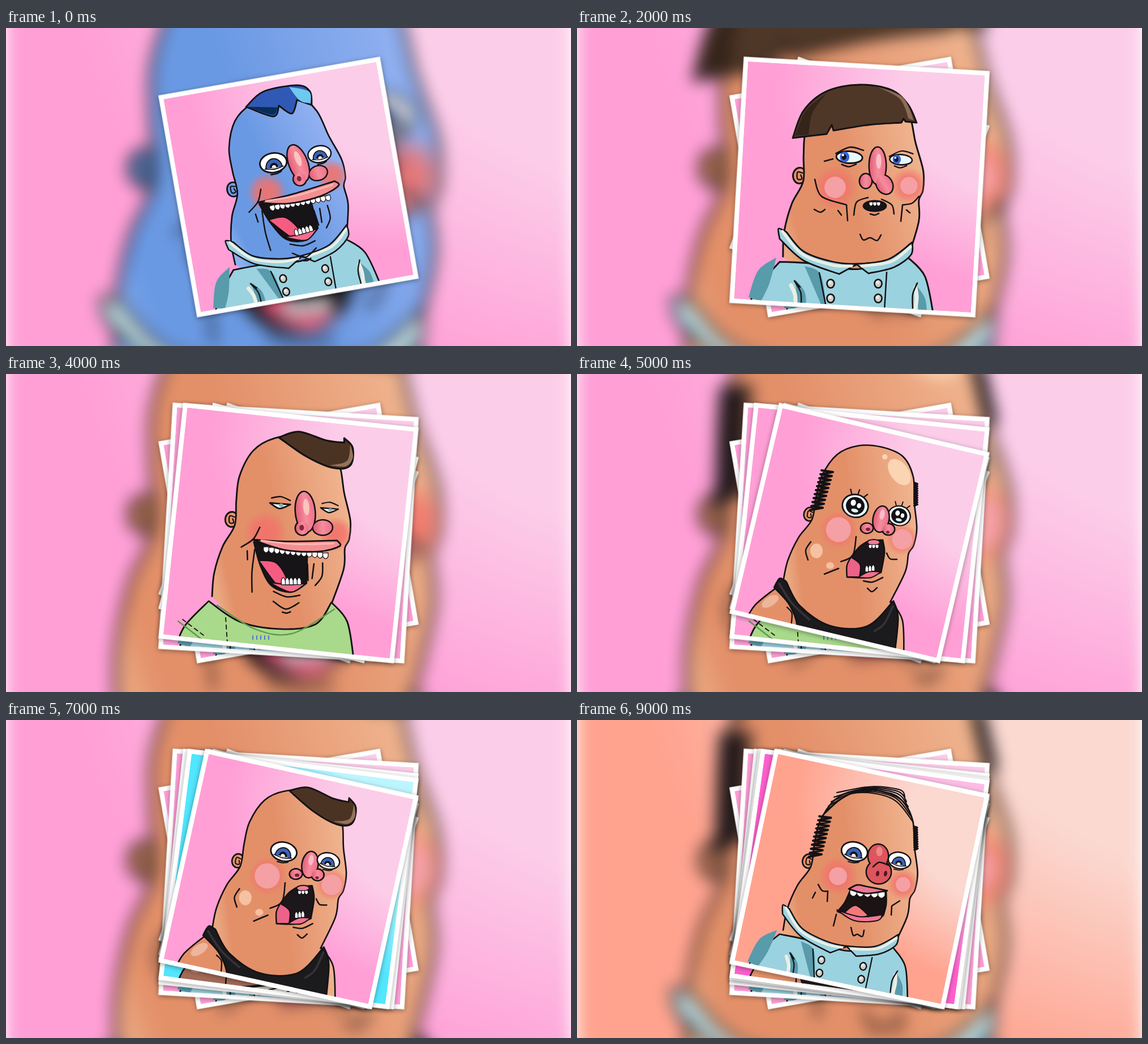
Animation, 998 px wide and 561 px high, one loop 10 s. Source, as an HTML page:

```html
<!DOCTYPE html>
<html lang="en">
<head>
<meta charset="utf-8">
<title>Portrait pile</title>
<style>
html, body { margin: 0; width: 100%; height: 100%; overflow: hidden; background: #fff; }
svg { display: block; width: 100vw; height: 100vh; stroke-linecap: round; stroke-linejoin: round; }
.blur { filter: blur(14px); }
.shadow { filter: drop-shadow(0 2px 4px rgba(0, 0, 0, .38)); }
.step { animation: 10s step-end infinite; }
</style>
</head>
<body>
<script>
const INK = '#141114', CX = 499, CY = 280.5, BOX = 460, UNIT = 400, BORDER = 8;

// Every tilted card fits the same box; the offset is how far a corner sits from the box corner.
const cards = [-68.5, 122, 25.5, 96.5, 44, 88, 52, 83, 56, 80].map(offset => {
  const rest = BOX - Math.abs(offset);
  return { angle: Math.atan2(offset, rest) * 180 / Math.PI, side: Math.hypot(offset, rest) };
});
const inner = card => card.side - 2 * BORDER;

// Art laid out on tilted card i, turned into upright picture space.
const upright = i => `scale(${UNIT / inner(cards[i])}) rotate(${-cards[i].angle}) translate(${-CX} ${-CY})`;
const on = (i, art) => `<g transform="${upright(i)}">${art}</g>`;
const repeat = (n, make) => Array.from({ length: n }, (_, k) => make(k)).join('');

// Smooth curve through key points; a slash marks a corner.
const smooth = text => text.split('/').map((run, k) => {
  const n = run.trim().split(/\s+/).map(Number);
  const pts = n.filter((_, i) => i % 2 === 0).map((x, i) => [x, n[2 * i + 1]]);
  const handle = (at, from, to) => at.map((v, j) => (v + (to[j] - from[j]) / 6).toFixed(1));
  return (k ? 'L' : 'M') + pts[0] + pts.slice(1).map((c, i) => {
    const b = pts[i], a = pts[i - 1] || b, e = pts[i + 2] || c;
    return `C${handle(b, a, c)} ${handle(c, e, b)} ${c}`;
  }).join('');
}).join('');

const path = (d, fill, width, ink = INK) => `<path d="${d}" fill="${fill}" stroke="${ink}" stroke-width="${width}"/>`;
const shape = (text, fill, width = 2.8, ink) => path(smooth(text) + 'Z', fill, width, ink);
const line = (text, width = 2.5, ink) => path(text.split('|').map(smooth).join(''), 'none', width, ink);
const oval = (x, y, rx, ry, fill, turn = 0, width = 0) =>
  `<ellipse cx="${x}" cy="${y}" rx="${rx}" ry="${ry}" fill="${fill}" transform="rotate(${turn} ${x} ${y})" stroke="${INK}" stroke-width="${width}"/>`;

// Overlapping ovals with one common outline.
const blob = (parts, fill, glint) => [5, 0].map(width =>
  parts.map(([x, y, rx, ry, turn]) => oval(x, y, rx, ry, fill, turn, width)).join('')).join('') +
  (glint ? oval(parts[0][0] + 2, parts[0][1] - 8, parts[0][2] / 3, parts[0][3] / 2.4, glint, parts[0][4]) : '');

const teeth = (x, y, width, rise, n, h) => path(repeat(n, k => {
  const w = width / n;
  return `M${x + k * w} ${y + k * rise / n}v${h * .6}q${w / 2} ${h * .8} ${w} 0v${-h * .6}z`;
}), '#fff', 1.2);

// Heads and bodies
const HEAD = '364 385 369 345 385 300 407 264 411 222 418 180 443 137 480 117 525 115 567 129 590 165 597 215 606 262 603 294 595 310 592 345 569 405';
const ear = tone => oval(402, 254, 11, 13, `url(#${tone})`, 8, 2.8) + line('407 250 399 248 398 259 405 260 404 253', 2.2);
const head = tone => on(8, ear(tone) + shape(HEAD + ' / 569 405 540 468 440 462 364 385', `url(#${tone})`, 0) + line(HEAD, 2.8));

const body = (fill, dip) => on(8, shape(`297 475 315 435 358 393 / 358 393 410 ${dip - 15} 480 ${dip} 540 ${dip - 6} 569 402 / 569 402 595 436 604 500 / 604 540 290 540`, fill));
const bare = tone => body(`url(#${tone})`, 420) + head(tone);
const shine = on(8, oval(343, 425, 18, 9, '#fff5', -38) + line('376 433 386 443 387 465|571 450 580 470 578 490'));

const tank = on(8, shape('348 398 357 380 370 385 / 370 385 400 428 460 460 530 454 575 402 / 575 402 587 435 586 520 / 400 520 398 465 380 428 348 398', '#1b1a1c') +
  line('357 390 385 425 420 452|575 412 562 446 545 462', 4, '#343236'));

const sleeves = (dark, light) => on(2,
  shape('303 475 320 428 352 405 / 352 405 340 450 325 482', dark, 0) + shape('385 443 402 465 405 490 / 390 490', dark, 0) +
  shape('598 452 614 475 618 498 / 603 498', dark, 0) + line('378 454 385 470 386 485|598 458 600 475 598 495', 7, light) +
  line('384 446 395 466 396 488|386 448 394 457|601 450 593 470 593 494'));

const uniform = body('#9bd2df', 415) + sleeves('#589bab', '#eceee4') + on(2,
  shape('402 420 430 434 440 490 / 432 490', '#589bab', 0) + line('428 432 440 492|547 431 543 498') +
  shape('358 372 356 354 370 360 / 370 360 400 394 450 412 494 416 550 408 592 378 / 592 378 590 400 560 422 515 433 / 494 417 463 434 / 463 434 400 410 358 372', '#9bd2df') +
  line('363 359 398 399 450 418 485 420|503 420 555 412 589 386', 5, '#eceee4') +
  [448, 532].map(x => [451, 477].map(y => oval(x, y, 6.5, 7.5, '#c9cbc5', 0, 2.6) + oval(x - 1, y - 2, 3, 3, '#e9eae5')).join('')).join(''));

const sweater = body('#fff', 445) + on(3,
  shape('352 360 366 353 / 366 353 400 396 470 416 555 403 / 555 403 548 427 470 429 400 403 352 360', '#fff') +
  line('327 425 334 411 345 407|556 484 557 468 564 457'));

const shirt = body('#a9d98a', 445) + on(4, line('373 408 440 450 505 458 580 415|304 436 348 470', 2.4, '#5e9a4c') +
  `<g stroke-dasharray="7 6">${line('312 433 353 464|388 430 392 490', 1.8)}</g>` +
  line(Array.from({ length: 5 }, (_, k) => `${436 + 7 * k} 462 ${436 + 7 * k} 468`).join('|'), 2, '#5277c9'));

const toga = on(6, shape('385 472 470 462 573 403 / 573 403 584 404 / 584 404 560 450 498 492', '#e8e9dd') +
  line('425 474 490 466 530 443|550 450 570 422', 6, '#bfc0b9') + line('410 473 490 463 530 434|455 478 510 462 552 422|490 483 540 456 570 417') +
  line('376 434 388 446 388 466|571 452 577 470 579 490') + oval(343, 430, 20, 12, '#fff4', -38));

// Hair
const bowl = on(2, shape('381 194 400 146 440 112 500 100 555 109 585 135 600 167 / 600 167 580 165 / 577 160 573 167 / 573 167 515 171 453 181 / 450 171 441 187', '#4e3726') +
  shape('531 104 575 122 595 163 / 586 160 570 125 531 104', '#8c6b55', 0) + shape('385 190 405 145 440 116 / 440 116 416 150 409 188', '#35241a', 0));
const swoop = on(3, shape('507 129 540 125 580 145 608 153 / 609 146 620 163 612 190 585 190 545 165 507 129', '#4b3323') +
  shape('617 157 618 178 605 190 580 185 / 580 185 608 182 617 157', '#95735a', 0));
const quiff = on(0, shape('424 139 455 112 514 101 537 112 540 136 / 540 136 514 127 / 514 127 505 151 482 137 / 482 137 472 156 424 139', '#3059b5') +
  shape('428 139 480 140 / 480 140 470 153 428 139', '#092d59', 0) + shape('500 104 535 112 538 133 / 538 133 519 128 500 104', '#6ec9ef', 0));
const sides = on(5, path('M432 170' + 'l20 3-22 4'.repeat(10) + 'M596 192' + 'l5 2-5 2'.repeat(10), 'none', 4));
const wisps = on(9, line(Array.from({ length: 6 }, (_, k) =>
  `${434 + 5 * k} ${168 - 8 * k} ${485 + 7 * k} ${130 - 2.5 * k} ${555 + 3 * k} ${138 - 3 * k} ${594 - 3 * k} ${180 - 9 * k}`).join('|'), 2.2));
const glare = on(8, oval(563, 159, 28, 17, '#fbd4b4', 48) + oval(533, 133, 5, 5, '#fbd4b4'));

// Short bristles standing on the dome of the skull.
const sprouts = on(8, repeat(6, k => {
  const t = (195 + 27 * k) * Math.PI / 180, x = 505 + 90 * Math.cos(t), y = 190 + 76 * Math.sin(t);
  return repeat(3, j => {
    const dx = 8 * Math.cos(j * 1.05 + .5), dy = 8 * Math.sin(j * 1.05 + .5);
    return line(`${x - dx} ${y - dy} ${x + dx} ${y + dy}`, 2.2);
  });
}));

// Eyes and cheeks keep their places on every upright face.
const eyes = art => [[-20, -49, 1], [67, -50, .86]].map(([x, y, size]) => `<g transform="translate(${x} ${y}) scale(${size})">${art}</g>`).join('');
const dome = (r, fill) => path(`M${-r} 9a${r} ${r * 1.1} 0 0 1 ${2 * r} 0z`, fill, 0);
const roundEyes = eyes(oval(0, 0, 25, 18, '#fff', 0, 3) + dome(16, INK) + dome(14, '#3b62b8') + dome(8, INK) + dome(4, '#fff') +
  line('-17 9 0 12 17 9', 2) + line('-8 21 3 21 12 18'));
const sleepyEyes = eyes(shape('-18 0 18 -1 / 18 -1 0 8 -18 0', '#e6f5f1') + oval(2, 2, 4, 3, '#86aeb4') + line('-16 -9 0 -13 17 -8'));
const glanceEyes = eyes(oval(0, 0, 22, 10, '#e8f8ff', 0, 2.8) + oval(-8, 0, 8, 9, '#3763dc') + oval(-9, 0, 4, 5, INK) + oval(-11, -3, 2, 2, '#fff') +
  line('-23 -5 0 -17 23 -13|-12 13 0 16 12 11'));
const staringEyes = eyes(oval(0, 0, 22, 18, '#fff', 0, 3) + oval(1, 0, 4, 3.5, INK) + oval(-1, 0, 2, 1.6, '#fff')) +
  line('-44 -68 -20 -66 3 -63|52 -63 70 -69 87 -74', 3.2) + line('-28 -28 -18 -27 -8 -32|70 -32 79 -32 86 -36');
const sparklyEyes = eyes(oval(0, 0, 25, 22, '#e9fbff', 0, 3) + oval(0, 0, 18, 17, INK) + oval(-5, -5, 5, 6, '#fff') +
  oval(7, -2, 4, 5, '#fff') + oval(1, 9, 7, 3.5, '#d8f7ff') + line('-12 -21 -16 -29|0 -23 1 -32|12 -20 18 -27'));
const shutEyes = eyes(line('-19 -8 -2 7 19 -10|-8 5 -12 11|0 7 0 13|8 4 12 10') +
  line(Array.from({ length: 4 }, (_, k) => `${-11 + 6 * k} -26 ${-10 + 6 * k} -20`).join('|')));

const cheeks = r => `<g clip-path="url(#face)">` + [[-41, 3, 1], [83, -7, .82]].map(([x, y, size]) =>
  oval(x, y, 38 * size, 38 * size, 'url(#blush)') + oval(x, y, r * size, r * size, '#f4a0a4')).join('') + '</g>';

const laugh = cheeks(0) + on(8,
  shape('439 294 449 335 467 370 500 382 527 368 / 530 318', '#171417') +
  shape('446 326 476 331 493 360 480 373 446 326', '#f65c82', 2) +
  shape('463 364 495 369 526 368 / 526 368 500 382 463 364', '#f46d8d', 2) +
  teeth(484, 369, 34, 1, 5, -12) + teeth(455, 303, 111, 15, 12, 10) +
  shape('437 290 500 295 582 296 / 582 296 586 306 550 314 490 309 437 290', '#f48e91') + line('452 292 510 300 576 301', 3, '#fbb9b4') +
  blob([[529, 245, 16, 34, -3], [523, 273, 11, 11], [558, 273, 16, 12]], 'url(#nose)', '#fcc4bf') + oval(522, 272, 4, 5, '#87273c') +
  line('440 307 434 345 433 380|427 309 427 324|417 302 438 289 450 269|530 335 530 363|541 335 537 360|556 334 554 357 542 372') +
  line('470 380 492 390 515 388|469 397 490 411 513 401|484 416 491 418 498 416'));

const glance = cheeks(18) + glanceEyes + on(2,
  blob([[531, 243, 14, 32], [510, 270, 10, 12], [543, 276, 13, 17, -30]], 'url(#nose)', '#fac0c6') +
  oval(526, 314, 20, 9, '#171417', 0, 2.8) + teeth(516, 307, 20, 0, 3, 7) +
  line('489 330 494 307 514 299|538 302 556 312 560 328|420 267 432 297 476 312 / 478 340|604 297 592 309 575 312 / 572 341') +
  line('500 364 506 374 518 370 530 375 537 365|419 320 430 325 438 320|461 322 467 330|582 321 588 326|437 235 452 231|518 328 526 330 533 327'));

const drool = cheeks(20) + on(6,
  oval(424, 320, 10, 13, '#fff4') + oval(516, 323, 50, 31, '#80684a', -17, 2.8) + oval(516, 320, 37, 18, '#171417', -14, 2.8) +
  teeth(510, 307, 24, -4, 3, 8) + teeth(501, 339, 26, -5, 4, -8) +
  shape('485 330 508 332 / 501 365 494 360 487 366', '#9ccdec', 2.2, '#356dc1') + line('494 338 494 356', 3, '#d4f2fb') +
  line('438 317 442 326 439 336|448 323 448 332|456 312 478 303 488 284|547 284 572 300|560 340 567 348'));

const pickle = on(3, blob(Array.from({ length: 24 }, (_, k) => {
  const t = (k >> 1) / 11, side = k % 2 * 2 - 1, spread = 7 + 7 * t;
  return [532 + 13 * t + side * spread, 229 + 80 * t + 2 * Math.sin(k * 5), 9, 9];
}), '#69aa43') + repeat(6, k => oval(533 + k * 2.5 + 5 * Math.sin(k * 3), 235 + k * 13, 3, 5, '#94cd62') +
  line(`${535 + 6 * Math.sin(k * 4)} ${242 + k * 12} ${540 + 6 * Math.sin(k * 4)} ${240 + k * 12} ${542 + 6 * Math.sin(k * 4)} ${247 + k * 12}`, 2.2, '#2e6726')));

const gasp = cheeks(24) + on(5,
  oval(423, 312, 11, 13, '#f5c1a0') + oval(447, 338, 7, 6, '#f5c1a0') +
  shape('485 322 500 304 516 294 / 540 293 543 315 537 350 / 537 350 510 359 477 358 / 477 358 477 338 485 322', '#1b171a') +
  shape('484 323 500 336 499 358 / 477 358 477 338 484 323', '#ec6288', 2) +
  shape('496 359 515 349 537 349 / 537 349 520 359 496 359', '#f36e90', 2) + teeth(509, 349, 17, -2, 3, -11) +
  oval(524, 297, 11, 5, '#f37b98', 0, 2) + teeth(515, 301, 18, 0, 3, 7) +
  blob([[537, 256, 13, 22, 10], [512, 272, 10, 8], [550, 274, 10, 9]], 'url(#nose)', '#fbbcc9') + oval(514, 274, 4, 3, '#7c233d') + oval(549, 279, 3, 2.5, '#7c233d') +
  line('408 328 404 311 413 296|437 353 462 343|466 331 487 320 493 287|547 316 553 326 565 327|506 365 522 367 540 359|513 378 521 384 530 377'));

const shut = shutEyes + on(6,
  blob([[529, 239, 13, 22], [517, 256, 10, 14, -25], [541, 257, 10, 14, 20], [534, 271, 9, 19]], 'url(#nose)', '#fbb9c9') +
  line('524 254 527 263 534 264|515 256 519 261'));

const shout = cheeks(17) + on(9,
  shape('483 300 546 303 / 546 303 546 325 541 345 / 541 345 500 350 460 338 / 460 338 473 322 483 300', '#1c1314') +
  shape('471 341 492 327 515 345 / 515 345 495 349 471 341', '#f4787b', 2) +
  shape('459 335 500 347 541 343 / 541 343 530 354 490 354 459 335', '#ee7896', 2) +
  teeth(482, 300, 62, 4, 5, 11) + shape('480 298 495 291 513 294 548 301 / 548 301 510 306 480 298', '#ec7894') +
  blob([[532, 240, 17, 20], [533, 268, 21, 20]], '#dd555d', '#ee8684') + line('523 259 534 251 550 256') +
  [531, 545].map(x => oval(x, 271, 3, 5, '#541923', 10)).join('') +
  line('426 290 433 301 443 302 / 442 320|421 304 416 314|458 343 453 363|544 331 538 347|570 319 556 328 / 555 344|484 366 488 380 495 378 504 382 507 371'));

const portraits = [
  ['pink', head('blue') + uniform + quiff + laugh + roundEyes],
  ['pink', head('skin') + sweater + sides + gasp + roundEyes],
  ['pink', head('skin') + uniform + bowl + glance],
  ['cyan', head('skin') + sweater + swoop + drool + staringEyes + pickle],
  ['pink', head('skin') + shirt + swoop + laugh + sleepyEyes],
  ['pink', bare('skin') + shine + tank + glare + sides + sparklyEyes + gasp],
  ['cyan', bare('brown') + toga + bowl + drool + shut],
  ['pink', bare('skin') + shine + tank + swoop + gasp + roundEyes],
  ['magenta', bare('skin') + shine + tank + glare + sprouts + laugh + sleepyEyes],
  ['salmon', head('skin') + uniform + sides + wisps + roundEyes + shout]
];

const stops = list => list.map(([at, color, alpha = 1]) => `<stop offset="${at}" stop-color="${color}" stop-opacity="${alpha}"/>`).join('');
const backdrop = (id, main, light) =>
  `<radialGradient id="${id}" gradientUnits="userSpaceOnUse" cx="0" cy="0" r="1" gradientTransform="translate(300 -160) scale(470 330)">${stops([[.5, light], [.96, main]])}</radialGradient>`;
const tone = (id, rim, main, light) =>
  `<linearGradient id="${id}" x1="0" y1=".6" x2="1" y2=".3">${stops([[0, rim], [.09, main], [.5, main], [1, light]])}</linearGradient>`;

const defs = backdrop('pink', '#ff9fd6', '#fccde9') + backdrop('cyan', '#52e6ff', '#bdf5ff') +
  backdrop('magenta', '#ff5fcd', '#fcbde5') + backdrop('salmon', '#ffa38f', '#fbd8d0') +
  tone('skin', '#eaa881', '#e39069', '#f0b691') + tone('blue', '#8cb0f0', '#6a99e3', '#94b2f2') + tone('brown', '#b27c69', '#a36a57', '#b98471') +
  `<linearGradient id="nose">${stops([[0, '#e35f78'], [.5, '#f58d9c'], [1, '#ee718a']])}</linearGradient>` +
  `<radialGradient id="blush">${stops([[0, '#f2726b', .95], [.5, '#f2726b', .8], [1, '#f2726b', 0]])}</radialGradient>` +
  `<clipPath id="square"><rect x="-200" y="-200" width="400" height="400"/></clipPath>` +
  `<clipPath id="face"><path d="${smooth(HEAD)}Z" transform="${upright(8)}"/></clipPath>` +
  portraits.map(([bg, art], i) => `<g id="portrait${i}" clip-path="url(#square)"><rect x="-200" y="-200" width="400" height="400" fill="url(#${bg})"/>${art}</g>`).join('');

const scenes = cards.map((_, i) =>
  `<g class="step blur" style="animation-name:scene${i}"><use href="#portrait${i}" transform="translate(${CX} ${CY}) scale(${998 / UNIT})"/></g>`).join('');
const pile = cards.map((card, i) =>
  `<g class="step" style="animation-name:card${i}"><g transform="translate(${CX} ${CY}) rotate(${card.angle})">
  <rect class="shadow" x="${-card.side / 2}" y="${-card.side / 2}" width="${card.side}" height="${card.side}" fill="#fff"/>
  <use href="#portrait${i}" transform="scale(${inner(card) / UNIT})"/></g></g>`).join('');

// A scene lasts one second; a card stays on the pile until the loop ends.
const timing = cards.map((_, i) => {
  const show = `0%{visibility:hidden}${i * 10}%{visibility:visible}`;
  return `@keyframes card${i}{${show}100%{visibility:visible}}@keyframes scene${i}{${show}${i * 10 + 10}%{visibility:hidden}}`;
}).join('');

document.body.innerHTML = `<style>${timing}</style><svg viewBox="0 0 998 561"><defs>${defs}</defs>${scenes}${pile}</svg>`;
</script>
</body>
</html>
```
